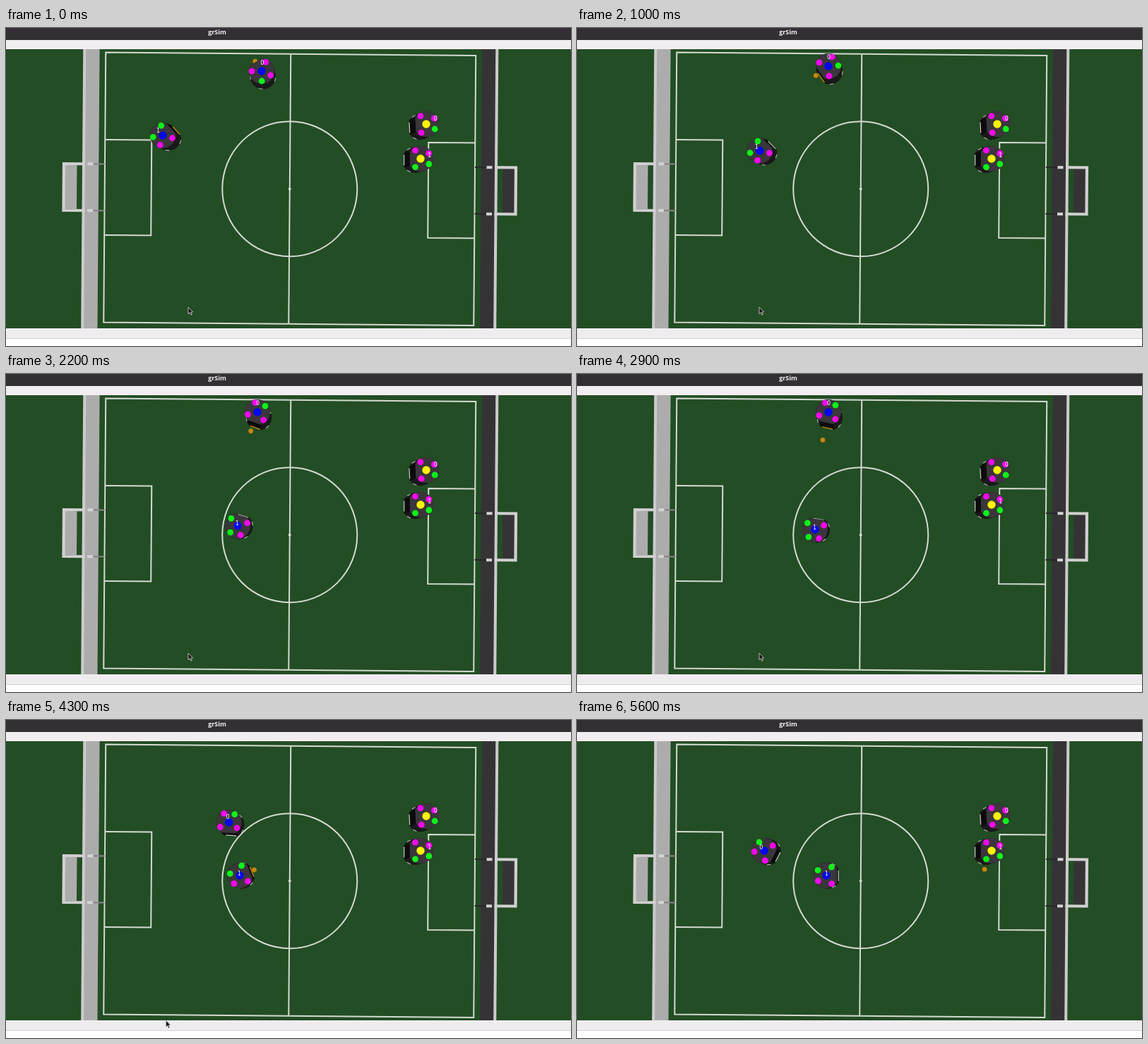
An HTML page with a canvas for the animation above (5.7 s loop, 800x450 px).

```html
<!DOCTYPE html>
<html lang="en">
<head>
<meta charset="utf-8">
<title>grSim</title>
<style>
html, body { margin: 0; width: 100%; height: 100%; overflow: hidden; background: #fff; }
canvas { display: block; }
</style>
</head>
<body>
<canvas id="stage" width="800" height="450"></canvas>
<script>
const ctx = document.getElementById('stage').getContext('2d');
const LOOP = 5700, STEP = 100;
const CENTER = [401.75, 227.75];
const PASS = 2850, CATCH = 3500, TURN = 3800, SHOT = 5050, GOAL = 5600;
const MAGENTA = '#f808f0', GREEN = '#0cf418', BLUE = '#0505f0', YELLOW = '#fff500';
const LINE = '#d3dad1', FRAME = '#d0d0d0', ORANGE = '#c48a12';

// Motion helpers
const mix = (a, b, f) => a + (b - a) * f;
const ramp = (t, from, to) => Math.min(1, Math.max(0, (t - from) / (to - from)));
const smooth = (t, from, to) => { const f = ramp(t, from, to); return f * f * (3 - 2 * f); };
const easeOut = (t, from, to, power) => 1 - (1 - ramp(t, from, to)) ** power;
const decay = (t, tau) => Math.exp(-Math.max(0, t) / tau);
const polar = (x, y, r, deg) => [x + r * Math.cos(deg * Math.PI / 180), y + r * Math.sin(deg * Math.PI / 180)];

// Poses: x, y, heading in degrees
function passer(t) {
  const settle = decay(t, 150);
  return [
    mix(356, 265, ramp(t, 3500, 5300)) + 6 * settle,
    mix(54, 185, easeOut(t, 3000, 5600, 1.7)) + 7 * settle,
    97 + 140 * decay(t, 910) - 70 * ramp(t, 4200, 5600)
  ];
}

function shooter(t) {
  const run = smooth(t, 0, 2650);
  return [
    mix(222, 337, run) - 6 * smooth(t, 3300, 3700) + 22 * smooth(t, 4300, 5000),
    mix(152, 220, run),
    -42 - 40 * smooth(t, 700, 2800) + 82 * (1 - decay(t - TURN, 380))
  ];
}

function nose([x, y, h], reach) {
  return polar(x, y, reach, h);
}

const passerBall = t => nose(passer(t), 17 + t / 200);
const shooterBall = t => nose(shooter(t), 22);

function ball(t) {
  if (t < PASS) return passerBall(t);
  if (t > CATCH && t < SHOT) return shooterBall(t);
  const [a, b, f] = t <= CATCH
    ? [passerBall(PASS), shooterBall(CATCH), ramp(t, PASS, CATCH)]
    : [shooterBall(SHOT), [577, 211], ramp(t, SHOT, GOAL)];
  return [mix(a[0], b[0], f), mix(a[1], b[1], f)];
}

const cursor = t => [mix(258, 187, ramp(t, 3900, 4800)), mix(395, 434, easeOut(t, 3900, 4800, 2.5))];

// Drawing helpers
function rect(color, x, y, w, h) {
  ctx.fillStyle = color;
  ctx.fillRect(x, y, w, h);
}

function trace(points) {
  ctx.beginPath();
  points.forEach(p => ctx.lineTo(...p));
}

function poly(color, ...points) {
  trace(points);
  ctx.fillStyle = color;
  ctx.fill();
}

function stroke(color, width, ...points) {
  trace(points);
  ctx.strokeStyle = color;
  ctx.lineWidth = width;
  ctx.stroke();
}

function dot(color, x, y, r) {
  ctx.beginPath();
  ctx.arc(x, y, r, 0, 7);
  ctx.fillStyle = color;
  ctx.fill();
}

// One half of the pitch, mirrored by side
function drawHalf(side, wall, post) {
  const band = (color, u, v, w, h) => rect(color, side * u, v, side * w, h);
  const line = (color, width, ...points) => stroke(color, width, ...points.map(([u, v]) => [side * u, v]));

  band(wall, 270.7, -205, 20, 410);
  band('#cbcbcb', 290, -205, 4, 410);
  line(LINE, 2, [0, -191], [262, -191], [262, 191], [0, 191]);
  line(LINE, 2, [262, -67.5], [196, -67.5], [196, 67.5], [262, 67.5]);
  band(wall, 301.5, -31, 17, 62);
  line(FRAME, 4.2, [290, -33], [320, -33], [320, 33], [290, 33]);
  for (const v of [-33, 33]) {
    line(post, 2, [262, v], [279, v]);
    band('#d4d4d4', 278.5, v - 2, 8, 4);
  }
}

function drawField() {
  rect('#234d24', 0, 30, 800, 395);
  ctx.save();
  ctx.transform(1, 0.0086, -0.00785, 1, ...CENTER);
  drawHalf(-1, '#acacac', '#858585');
  drawHalf(1, '#363337', '#29272a');
  stroke(LINE, 2, [0, -191], [0, 191]);
  ctx.beginPath();
  ctx.arc(0, 0, 95.5, 0, 7);
  ctx.stroke();
  dot(LINE, 0, 0, 2);
  ctx.restore();
}

function drawWindow() {
  rect('#332f34', 0, 0, 800, 17);
  rect('#f2edf0', 0, 17, 800, 13);
  rect('#efecef', 0, 425, 800, 14);
  rect('#d4d2d4', 0, 439, 800, 1);
  rect('#ffffff', 0, 440, 800, 10);
  ctx.fillStyle = '#f4f2f4';
  ctx.font = 'bold 9px "Open Sans", "Noto Sans", sans-serif';
  ctx.fillText('grSim', 299, 9);
}

function shell(x, y, h, color) {
  ctx.beginPath();
  ctx.arc(x, y, 18, (h + 33) * Math.PI / 180, (h - 33) * Math.PI / 180);
  ctx.fillStyle = color;
  ctx.fill();
}

function robot([x, y, h], team, id, dribbling) {
  // The base leans towards the camera axis, the label away from it
  const dx = CENTER[0] - x, dy = CENTER[1] - y;
  const bx = x + dx * 0.045, by = y + dy * 0.045;
  const chord = (cx, cy, half) => [-90, 90].map(turn => polar(...polar(cx, cy, 15, h), half, h + turn));

  for (let f = 0; f <= 1; f += 0.125) shell(mix(bx, x, f), mix(by, y, f), h, '#1a191a');
  poly('#0c0b0c', ...chord(bx, by, 10), ...chord(x, y, 10).reverse());
  for (const turn of [-137, -62, 62, 137])
    stroke('#b4b4b4', 1.1, polar(bx, by, 18, h + turn - 9), polar(bx, by, 18, h + turn + 9));
  stroke(dribbling ? ORANGE : '#bcbcbc', 1.3, ...chord(bx, by, 7.5));
  shell(x, y, h, '#3a363b');

  const spots = [[-57.5, id ? GREEN : MAGENTA], [57.5, MAGENTA], [147.5, MAGENTA], [-147.5, GREEN]];
  for (const [turn, color] of spots) dot(color, ...polar(x, y, 14, h + turn), 4.4);
  dot(team, x, y, 5.7);
  ctx.fillStyle = '#fff';
  ctx.font = '8px "DejaVu Sans", sans-serif';
  ctx.fillText(id, x + 3 - dx * 0.053, y - dy * 0.055);
}

function drawCursor(x, y) {
  const shape = [[0, 0], [0, 9.5], [2.2, 7.6], [3.8, 11], [5.4, 10.2], [3.8, 7], [6.6, 6.8], [0, 0]]
    .map(([u, v]) => [x + u, y + v]);
  poly('#161616', ...shape);
  stroke('#c8c8c8', 0.9, ...shape);
}

function draw(t) {
  ctx.textAlign = 'center';
  drawField();
  const [x, y] = ball(t);
  dot('#8a5f0c', x, y + 0.5, 3.6);
  dot(ORANGE, x, y, 3.1);
  robot([595, 136, 177], YELLOW, 0, false);
  robot([587, 185, 180], YELLOW, 1, false);
  robot(passer(t), BLUE, 0, t < 3000);
  robot(shooter(t), BLUE, 1, t < 300 || (t > 3100 && t < SHOT));
  drawWindow();
  if (t < 4700) drawCursor(...cursor(t));
}

function tick() {
  const t = performance.now() % LOOP;
  draw(Math.floor(t / STEP) * STEP);
  requestAnimationFrame(tick);
}
tick();
</script>
</body>
</html>
```
